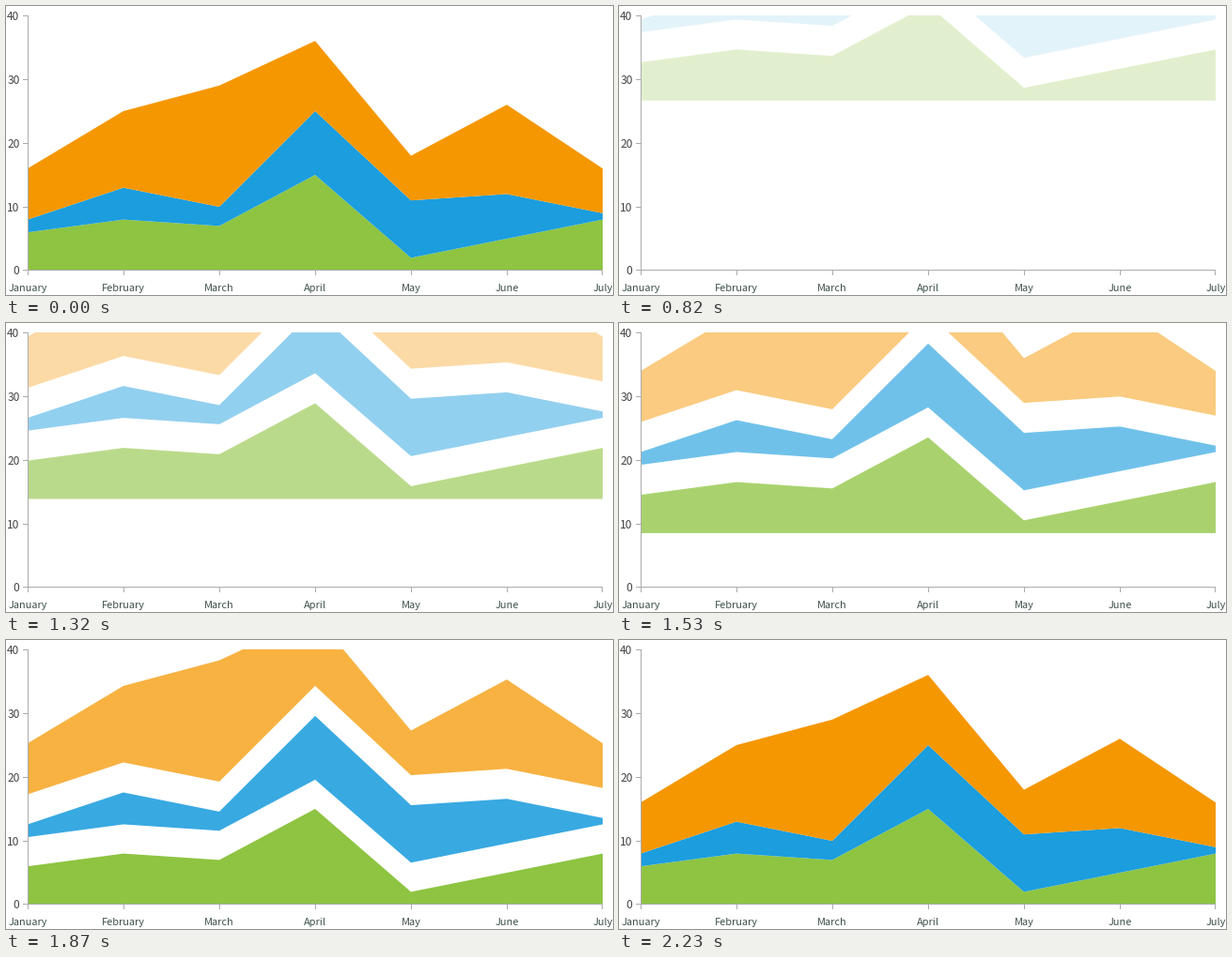
Recreate the animation shown at these times as a matplotlib script. Size 646 by 308 pixels, loop 3020 ms.

```python
import numpy as np
import matplotlib.pyplot as plt
from matplotlib.animation import FuncAnimation
from matplotlib.patches import Rectangle

W, H, DPI = 646, 308, 100
LOOP, TICK = 3020, 10
PX = 72 / DPI

# Plot area in pixels, y pointing down
LEFT, RIGHT, TOP, BASE = 23, 635, 10, 282
UNIT = (BASE - TOP) / 40

MONTHS = ["January", "February", "March", "April", "May", "June", "July"]
SERIES = [
    ("#8EC441", [6, 8, 7, 15, 2, 5, 8]),
    ("#1B9DDE", [2, 5, 3, 10, 9, 7, 1]),
    ("#F59700", [8, 12, 19, 11, 7, 14, 7]),
]

# Timing in ms: the chart clears, then each layer drops in after the last
CLEAR, SHOW, DONE = 410, 600, 2230
FIRST_END, STAGGER, FADE = 1865, 184.5, 1400
DROP_SPEED = 0.0255  # axis units per ms
STEPS = np.concatenate([
    np.round((SHOW + 31.1 * np.arange(34)) / 10) * 10,
    np.arange(1660, DONE, 30),
])

plt.rcParams["font.family"] = "Noto Sans CJK JP"
fig = plt.figure(figsize=(W / DPI, H / DPI), dpi=DPI, facecolor="white")
ax = fig.add_axes([0, 0, 1, 1])
ax.set_xlim(0, W)
ax.set_ylim(H, 0)
ax.axis("off")

xs = np.linspace(LEFT, RIGHT, len(MONTHS))


def bar(x, y, w=1, h=1):
    ax.add_patch(Rectangle((x, y), w, h, fc="#ABABAB", lw=0, zorder=3))


def label(x, y, text, ha, color, size):
    ax.text(x, y, text, ha=ha, va="baseline", color=color, fontsize=size * PX)


def draw_axes():
    bar(LEFT, TOP, h=BASE - TOP)
    bar(LEFT, BASE - 1, w=RIGHT - LEFT)
    for v in range(0, 50, 10):
        y = min(BASE - v * UNIT, BASE - 1)
        bar(LEFT - 5, y, w=5)
        label(14.5, y + 5, str(v), "right", "#444444", 12)
    for x, name in zip(xs, MONTHS):
        bar(min(x, RIGHT - 1), BASE, h=5)
        label(x, 304, name, "center", "#3C5048", 11)


def make_layers():
    plot_area = Rectangle((LEFT, TOP), RIGHT - LEFT, BASE - TOP,
                          transform=ax.transData)
    low = np.zeros(len(MONTHS))
    layers = []
    for color, values in SERIES:
        high = low + values
        pts = np.column_stack([np.r_[xs, xs[::-1]],
                               BASE - UNIT * np.r_[low, high[::-1]]])
        patch, = ax.fill(*pts.T, color=color, lw=0, zorder=2)
        patch.set_clip_path(plot_area)
        layers.append((patch, pts))
        low = high
    return layers


draw_axes()
layers = make_layers()


def pose(t):
    """Remaining time of the drop for each layer, or None while cleared."""
    if t < CLEAR or t >= DONE:
        return [0] * len(layers)
    if t < SHOW:
        return [None] * len(layers)
    now = STEPS[np.searchsorted(STEPS, t, side="right") - 1]
    return [max(0, FIRST_END + i * STAGGER - now) for i in range(len(layers))]


def update(n):
    for (patch, pts), left in zip(layers, pose(n * TICK)):
        patch.set_visible(left is not None)
        if left is not None:
            patch.set_xy(pts - [0, left * DROP_SPEED * UNIT])
            patch.set_alpha(max(0, 1 - left / FADE))
    return [patch for patch, _ in layers]


anim = FuncAnimation(fig, update, frames=LOOP // TICK, interval=TICK,
                     repeat=True, repeat_delay=0, blit=False)
plt.show()
```
